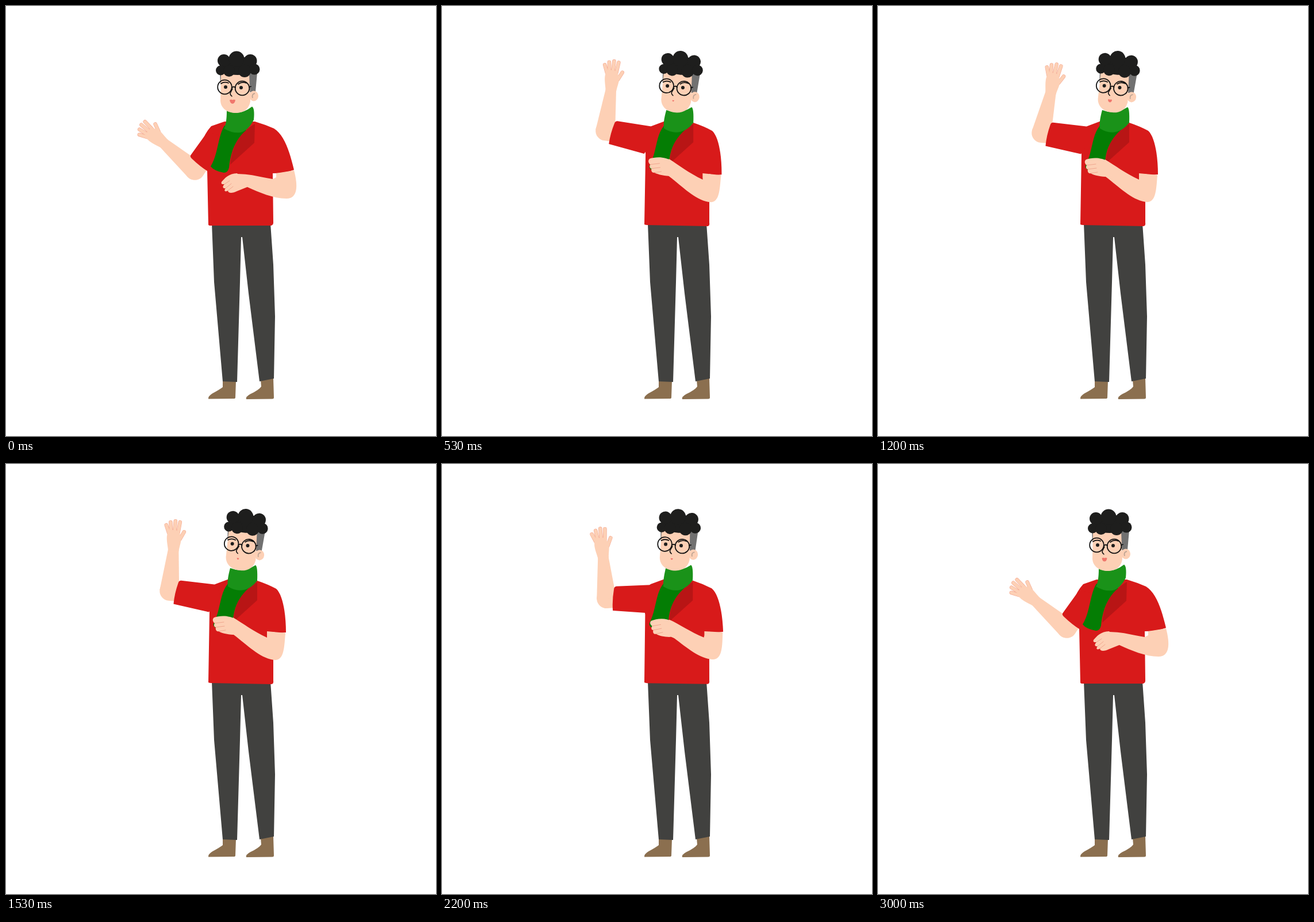
An HTML page for the animation above (3.03 s loop, 748 by 748 pixels).

```html
<!DOCTYPE html>
<html lang="en">
<head>
<meta charset="utf-8">
<title>Waving man</title>
<style>
  html, body { margin: 0; height: 100%; overflow: hidden; background: #fff; }
  svg { display: block; width: 100vw; height: 100vh; }
  .skin { fill: #fdd0b5; }
  .red { fill: #d81a1a; }
  .hair { fill: #1e1e1d; }
  .grey { fill: #717171; }
  .shoe { fill: #8b6f4f; }
  .ink { fill: none; stroke: #111; stroke-width: 1.8; stroke-linecap: round; }
  .crease { fill: none; stroke: #f0a78f; stroke-width: 1; stroke-linecap: round; }
  .finger { fill: none; stroke: #fdd0b5; stroke-width: 5.4; stroke-linecap: round; }
  .rim { stroke: #f3a892; stroke-width: 6.6; }
</style>
</head>
<body>
<!-- data-raised holds the same path with the arm up -->
<svg viewBox="0 0 748 748">
  <path class="shoe" d="M377 650L400 652L399 681Q399 683 396 683L352 683.500Q351 679 359 674Q372 667 377 663Z"/>
  <path class="shoe" d="M443 650L465 647L466 681Q466 683.500 463 683.500L418 684Q416 680 425 675Q440 668 444 662Z"/>
  <path fill="#41413f" d="M358 378L362 480L377 653L402 654L407 480L409 402L411 402L422 500L441 653L466 648L468 540L465 450L460 378Z"/>

  <path id="upperArm" stroke="#fdd0b5" stroke-width="34" stroke-linecap="round"/>
  <g id="forearm">
    <path class="skin" d="M-17 0L-9 -74H9L17 0Z"/>
    <g transform="translate(0 -73) rotate(-5.500)">
      <path id="fingers" class="finger rim" d="M-8 -28L-12.500 -42M-4 -30L-5 -47M2 -30L3.500 -49M8 -28L11.500 -47M11 -17L18.500 -30"/>
      <path class="finger" d="M-8 -28L-12.500 -42M-4 -30L-5 -47M2 -30L3.500 -49M8 -28L11.500 -47M11 -17L18.500 -30"/>
      <path class="skin" d="M-9 4C-10 -6 -12 -14 -11.500 -22L-10 -31Q0 -36 10 -31L13 -20C14 -13 11 -8 9 4Z"/>
    </g>
  </g>

  <path class="red" d="M380 201L357 209Q345 222 340 240L350 285L352 380Q352 382 356 382L461 382Q465 381 465 377L464 291Q485 291 501 285C493 252 484 224 466 213Q450 206 433 201Z"
    data-raised="M388 200L364 209Q355 215 350 225L354 258L352 380Q354 381 357 381L461 383Q466 383 465 377L465 292Q472 295 487 293C487 262 482 228 470 217Q455 209 437 203Z"/>
  <path id="sleeve" class="red" d="M0 18L62 23Q66 23 67 19Q73 0 74 -18L12 -30L-6 0Z"/>
  <path fill="#b81515" d="M433 205L432 238L390 276C392 250 402 222 433 205Z"
    data-raised="M437 205L437 237L396 274C396 250 406 222 437 205Z"/>
  <path fill="#047d04" d="M380 208C369 225 369 258 356 279Q362 287 379 290Q386 290 388 281C390 258 398 232 418 216Z"
    data-raised="M386 208C372 225 374 250 362 276Q358 281 366 286Q392 290 395 272C396 252 404 232 422 216Z"/>
  <path fill="#1a9219" d="M384 182Q406 192 428 175Q433 178 431 198Q421 217 408 220Q394 222 379 213Q384 205 384 182Z"
    data-raised="M390 181Q412 190 434 176Q438 178 437 203Q427 216 414 219Q400 222 386 213Q384 203 390 181Z"/>

  <path class="skin" d="M398 292C425 292 440 297 464 301L470 298L470 291L501 286C508 312 508 335 488 335C465 335 440 324 420 315L398 305Z"
    data-raised="M395 267C412 277 430 291 454 302L454 298L454 291L486 294C484 318 484 341 468 341C445 339 425 320 400 300L380 285Z"/>
  <path class="skin" d="M402 291C388 291 380 300 375 306C373 311 379 310 380 310C375 315 378 318 382 317C378 322 382 324 386 321C386 326 394 326 402 322L422 314Z"
    data-raised="M402 272C388 262 372 264 362 267C358 270 360 275 363 277C361 280 362 284 365 284C364 288 366 292 370 291C376 295 390 297 398 297L408 304Z"/>
  <path class="crease" d="M389 304L380 310M392 309L382 317M395 314L386 321"
    data-raised="M379 275L363 277M380 282L365 284M382 289L370 291"/>

  <g id="head">
    <path class="grey" d="M372 116H380V135H373ZM418 116H437L434 149L424 150Z"/>
    <path class="skin" d="M374 117L373 165C374 180 388 187 402 186C415 185 423 178 425 166L423 117Z"/>
    <ellipse class="skin" cx="431" cy="156.500" rx="8" ry="9"/>
    <path fill="none" stroke="#bfa594" stroke-width="1.800" d="M433 152Q427 153 429 160"/>
    <g class="hair">
      <ellipse cx="403" cy="104" rx="31" ry="16"/>
      <circle cx="379" cy="95" r="11"/><circle cx="401" cy="92" r="13.500"/>
      <circle cx="425" cy="95.500" r="11.500"/><circle cx="373.500" cy="112" r="8.500"/>
      <circle cx="388" cy="113" r="10"/><circle cx="415" cy="113" r="11"/>
      <circle cx="432" cy="110" r="9.500"/>
    </g>
    <g class="ink">
      <circle cx="380.500" cy="141" r="12.300"/><circle cx="411" cy="143" r="12.300"/>
      <path d="M393 142Q396 139 399 142M423 141L426 140M374 135Q380 131 387 134M404 136Q410 131 418 134"/>
      <path stroke-width="1.500" d="M394 144L390 152Q390 155 393 157"/>
    </g>
    <circle class="hair" cx="382" cy="141" r="3"/><circle class="hair" cx="409" cy="142" r="3"/>
    <path id="mouth" fill="#f0766c" d="M-5 -2.500Q-2 -4 0 -2.500Q2 -4 5 -2.500Q4 4 0 4Q-4 4 -5 -2.500Z"/>
  </g>
</svg>
<script>
const LOOP = 3030;
const SHOULDER = [366, 228];
const $ = id => document.getElementById(id);

// Pairs of time and value
const keys = {
  body: [[0, 0], [250, .5], [530, 1.04], [870, 1], [1930, 1], [2130, .95], [2430, .27], [2750, .03], [3000, 0], [LOOP, 0]],
  head: [[0, 0], [250, .4], [530, .87], [900, 1], [1600, 1], [1930, .8], [2130, .68], [2430, .33], [2800, .02], [3000, 0], [LOOP, 0]],
  forearm: [[0, -139], [250, -116], [530, -82.3], [600, -81], [870, -84.5], [1200, -77], [1530, -84.5],
    [1860, -79], [1930, -79.7], [2130, -88], [2430, -122.6], [2750, -137], [3000, -139], [LOOP, -139]],
  mouth: [[0, 1], [250, .4], [390, .9], [530, .35], [870, 1], [1080, .4], [1300, .95], [1530, .38],
    [1930, 1], [2200, .4], [2300, .8], [2430, .6], [2700, .4], [3000, .9], [LOOP, 1]]
};

const lerp = (a, b, k) => a + (b - a) * k;

// Monotone cubic curve through the keys
function at(list, t) {
  const slope = i => list[i] && list[i + 1] ? (list[i + 1][1] - list[i][1]) / (list[i + 1][0] - list[i][0]) : 0;
  const tangent = i => {
    const a = i ? slope(i - 1) : 0, b = slope(i);
    return a * b > 0 ? 2 * a * b / (a + b) : 0;
  };
  let i = 0;
  while (i < list.length - 2 && t >= list[i + 1][0]) i++;
  const [t0, v0] = list[i], [t1, v1] = list[i + 1];
  const span = t1 - t0, k = (t - t0) / span, s = k * k * (3 - 2 * k);
  return lerp(v0, v1, s) + span * k * (1 - k) * ((1 - k) * tangent(i) - k * tangent(i + 1));
}

const number = /-?\d+(\.\d+)?/g;
const morphs = [...document.querySelectorAll('[data-raised]')].map(el => ({
  el, rest: el.getAttribute('d'), raised: el.dataset.raised.match(number)
}));

function draw(t) {
  const body = at(keys.body, t), head = at(keys.head, t), mouth = at(keys.mouth, t);

  for (const { el, rest, raised } of morphs) {
    let i = 0;
    el.setAttribute('d', rest.replace(number, n => lerp(+n, +raised[i++], body).toFixed(2)));
  }

  const [x, y] = SHOULDER;
  const angle = lerp(120, 182, body);
  const rad = (angle + 3) * Math.PI / 180, length = lerp(69, 82, body);
  const ex = x + length * Math.cos(rad), ey = y + length * Math.sin(rad);
  $('upperArm').setAttribute('d', `M${x} ${y}L${ex} ${ey}`);
  $('sleeve').setAttribute('transform', `translate(${x} ${y}) rotate(${angle}) scale(${lerp(.8, 1, body)} 1)`);
  $('forearm').setAttribute('transform', `translate(${ex} ${ey}) rotate(${at(keys.forearm, t) + 90})`);
  $('head').setAttribute('transform', `translate(${7.7 * head} 0) rotate(${5 * head} 410 185)`);
  $('mouth').setAttribute('transform', `translate(394 166) scale(${mouth})`);
}

function tick() {
  draw(performance.now() % LOOP);
  requestAnimationFrame(tick);
}
tick();
</script>
</body>
</html>
```
